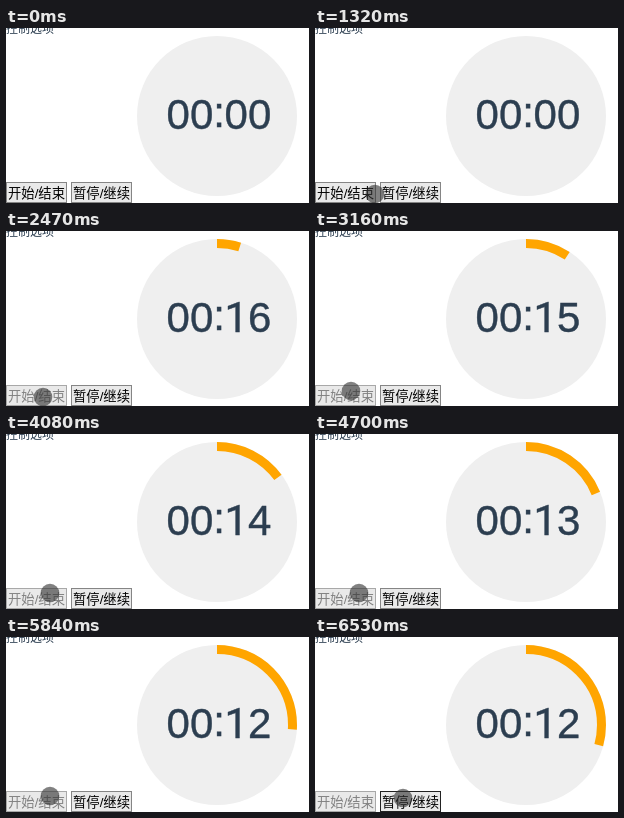
These frames come from a looping animation (303 by 175 pixels, 8 s). An HTML page:

```html
<!DOCTYPE html>
<html lang="zh">
<meta charset="utf-8">
<title>Timer</title>
<style>
  html, body { margin: 0; width: 100%; height: 100%; overflow: hidden; background: #fff; }
  svg { display: block; width: 100vw; height: 100vh; }
  text { font: 13.333px "Liberation Sans", "Noto Sans CJK SC", "Noto Sans CJK", sans-serif; fill: #000; }
  .title { font-size: 12px; fill: #2c3e50; }
  .clock text { font-size: 42px; fill: #2c3e50; stroke: #2c3e50; stroke-width: .4; }
  .clock .one { font-family: Roboto, sans-serif; }
  .button rect { fill: #e9e9e9; stroke: #858585; }
  .off text { fill: #808080; }
  .off rect { stroke: #a8a8a8; }
  .focus rect { stroke: #222; }
</style>
<svg viewBox="0 0 303 175">
  <text class="title" x="0" y="5">控制选项</text>
  <g class="clock">
    <circle cx="211" cy="88" r="80" fill="#efefef"/>
    <circle id="arc" cx="211" cy="88" r="75.5" fill="none" stroke="#ffa500" stroke-width="9"
      pathLength="16" transform="rotate(-90 211 88)"/>
    <text x="160.6" y="100.6">00</text>
    <text x="207.3" y="98.6">:</text>
    <text id="tens" x="218.5" y="100.6">0</text>
    <text id="ones" x="241.9" y="100.6">0</text>
  </g>
  <g id="start" class="button" transform="translate(0 154)">
    <rect x=".5" y=".5" width="60" height="20"/>
    <text x="2" y="16">开始/结束</text>
  </g>
  <g id="pause" class="button" transform="translate(65 154)">
    <rect x=".5" y=".5" width="60" height="20"/>
    <text x="2" y="16">暂停/继续</text>
  </g>
  <circle id="cursor" r="9.3" fill="#333" fill-opacity=".62"/>
</svg>
<script>
  const LOOP = 8000, START = 1690, PAUSE = 6380, TOTAL = 16;
  const $ = id => document.getElementById(id);

  // time, x, y
  const path = [
    [310, 170, 181], [1070, 76, 168], [1320, 60, 166], [1540, 37, 166],
    [2470, 37, 166], [3160, 36, 160], [4080, 44, 159], [5920, 44, 159],
    [6380, 86, 161], [6530, 88, 161]
  ];

  function cursorAt(t) {
    const i = path.findIndex(p => p[0] > t);
    if (i < 0) return path.at(-1).slice(1);
    const [t0, x0, y0] = path[i - 1], [t1, x1, y1] = path[i];
    const k = (t - t0) / (t1 - t0);
    return [x0 + (x1 - x0) * k, y0 + (y1 - y0) * k];
  }

  function draw(now) {
    const t = now % LOOP;
    const running = t >= START;
    const elapsed = Math.max(0, Math.min(t, PAUSE) - START) / 1000;

    $('arc').style.display = running ? '' : 'none';
    $('arc').setAttribute('stroke-dasharray', `${elapsed} ${TOTAL}`);

    const secs = running ? Math.ceil(TOTAL - elapsed) : 0;
    const tens = Math.floor(secs / 10);
    $('tens').textContent = tens;
    $('tens').classList.toggle('one', tens === 1);
    $('ones').textContent = secs % 10;

    $('start').classList.toggle('off', running);
    $('pause').classList.toggle('focus', t >= PAUSE);

    const visible = t >= path[0][0];
    $('cursor').style.display = visible ? '' : 'none';
    if (visible) $('cursor').setAttribute('transform', `translate(${cursorAt(t)})`);
    requestAnimationFrame(draw);
  }
  draw(0);
</script>
</html>
```
